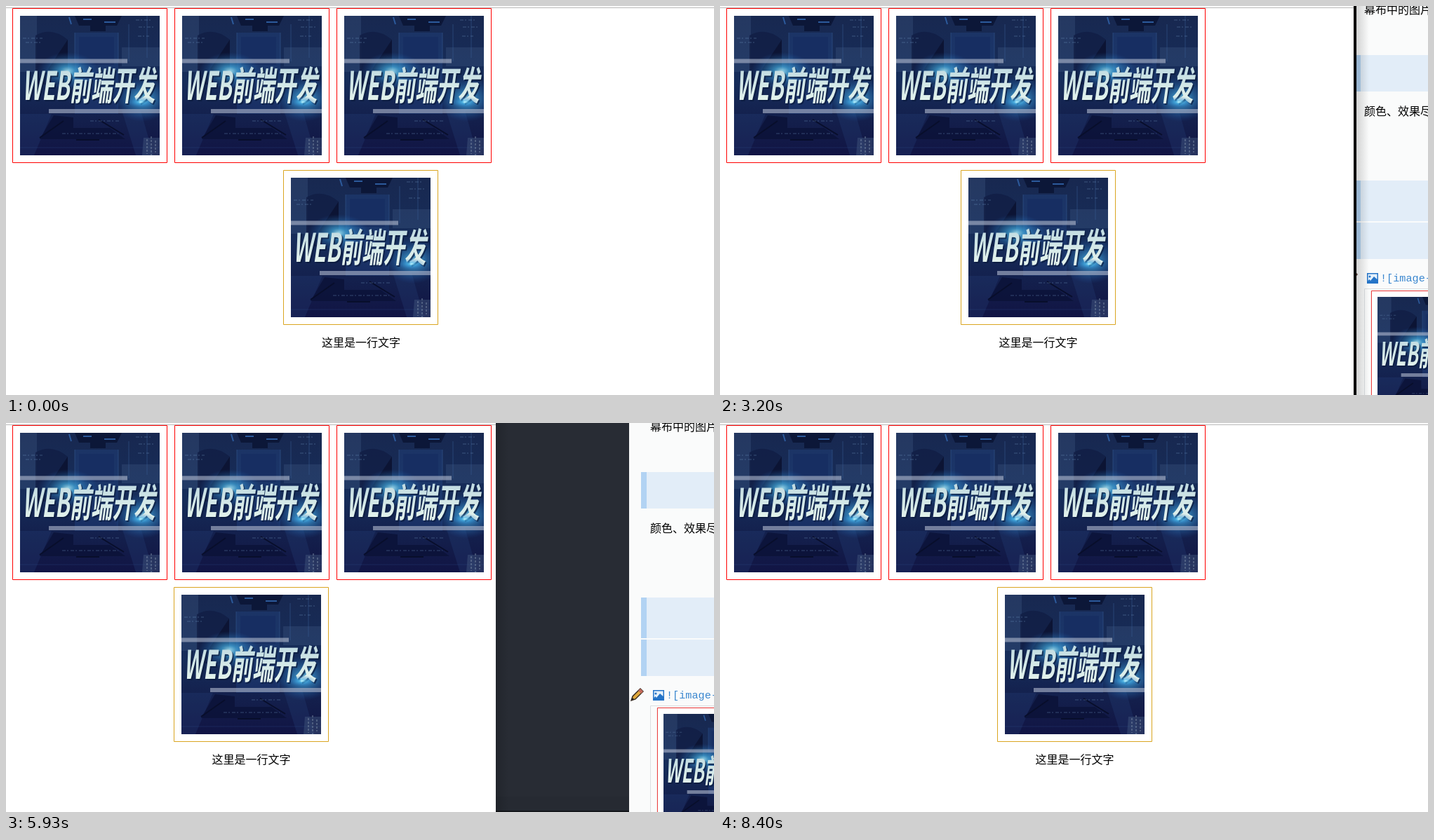
Animation, 1009 px wide and 555 px high, one loop 8470 ms. Source, as an HTML page:

```html
<!DOCTYPE html>
<html lang="zh">
<head>
<meta charset="utf-8">
<title>Window resize</title>
<style>
html, body { margin: 0; width: 100%; height: 100%; overflow: hidden; background: #fff; }
svg { display: block; }
text { font-family: "Noto Sans CJK SC", "Noto Sans CJK", sans-serif; font-size: 16px; fill: #000; white-space: pre; }
.title { font-size: 56px; font-weight: bold; fill: url(#letters); }
.code { font-family: "Liberation Mono", monospace; font-size: 15.2px; fill: #3a87cf; }
</style>
</head>
<body>
<svg width="1009" height="555" viewBox="0 0 1009 555">
  <defs>
    <linearGradient id="sky" x2="0" y2="1">
      <stop offset="0" stop-color="#182850"/>
      <stop offset=".45" stop-color="#162d5a"/>
      <stop offset=".8" stop-color="#131d4a"/>
      <stop offset="1" stop-color="#111444"/>
    </linearGradient>
    <linearGradient id="letters" x2="0" y2="1">
      <stop offset=".25" stop-color="#c2dce2"/>
      <stop offset=".8" stop-color="#e2f2ec"/>
    </linearGradient>
    <radialGradient id="glow">
      <stop offset="0" stop-color="#b5f4ff"/>
      <stop offset=".25" stop-color="#46b4ea" stop-opacity=".8"/>
      <stop offset="1" stop-color="#1e62b4" stop-opacity="0"/>
    </radialGradient>
    <linearGradient id="shade">
      <stop offset="0" stop-opacity=".16"/>
      <stop offset="1" stop-opacity="0"/>
    </linearGradient>
    <clipPath id="crop"><rect width="199" height="199"/></clipPath>

    <g id="photo" clip-path="url(#crop)">
      <rect width="199" height="199" fill="url(#sky)"/>
      <path d="M0 0H24V80H0ZM145 45H199V72H145Z" fill="#3c5680" opacity=".35"/>
      <path d="M22 28Q45 15 68 34V98H22Z" fill="#111d43" opacity=".75"/>
      <path d="M68 34V98L40 76Z" fill="#0b1230" opacity=".8"/>
      <path d="M78 24H140V140H78Z" fill="#23488a" opacity=".35"/>
      <path d="M84 30H134V70H84Z" fill="#162d61" opacity=".75"/>
      <path d="M78 0H145L138 14H122V22H100V14H84Z" fill="#0c1738"/>
      <path d="M90 5H102M120 9H136M70 2L73 12" stroke="#2c5a9c" stroke-width="2"/>
      <path d="M78 24V66M140 24V66M155 12V65M181 0V60" stroke="#386097" opacity=".5"/>
      <path d="M0 140H45L20 199H0ZM145 135H172L190 199H165Z" fill="#263f78" opacity=".3"/>
      <path d="M48 142L76 145V160H128L150 176H28Z" fill="#0a1237" opacity=".8"/>
      <path d="M28 174L62 150M112 148L148 170M80 177H113" stroke="#080e2b" stroke-width="2"/>
      <path d="M4 32H32M8 38H29M165 6H187M169 16H190M168 29H184M100 150H142M60 168H140" stroke="#7398c2" stroke-dasharray="5 2 2 3" opacity=".4"/>
      <path d="M0 188H199" stroke="#31518d" opacity=".3"/>
      <path d="M176 174H199V199H174Z" fill="#42597f" opacity=".45"/>
      <path d="M181 176V197M187 172V199M193 178V195" stroke="#8799ae" stroke-width="2" stroke-dasharray="3 2" opacity=".4"/>
      <ellipse cx="68" cy="79" rx="44" ry="27" fill="url(#glow)" opacity=".85"/>
      <ellipse cx="174" cy="119" rx="42" ry="32" fill="url(#glow)" opacity=".8"/>
      <path d="M0 64.5H153M41 136H199" stroke="#aeb7cc" stroke-width="6" opacity=".62"/>
      <g transform="translate(3 120) skewX(-8) scale(.545 1)">
        <text class="title" x="4" y="2" style="fill:#0a1a3c" opacity=".7">WEB前端开发</text>
        <text class="title">WEB前端开发</text>
      </g>
      <ellipse cx="172" cy="123" rx="20" ry="8" fill="url(#glow)" opacity=".85"/>
    </g>
    <g id="card">
      <rect x=".5" y=".5" width="220" height="220" fill="#fff" stroke="currentColor" vector-effect="non-scaling-stroke"/>
      <use href="#photo" x="11" y="11"/>
    </g>
  </defs>

  <!-- editor behind the window -->
  <rect width="1009" height="555" fill="#fafbfb"/>
  <rect width="888" height="555" fill="#282c34"/>
  <rect y="533" width="888" height="20" fill="#262a32"/>
  <rect y="553" width="888" height="2" fill="#15171b"/>
  <text x="918" y="11">幕布中的图片</text>
  <text x="918" y="156">颜色、效果尽</text>
  <path d="M905 70H1009V122H905ZM905 249H1009V307H905ZM905 309H1009V361H905Z" fill="#e2edf8"/>
  <path d="M905 70H913V122H905ZM905 249H913V307H905ZM905 309H913V361H905Z" fill="#b2d3f3"/>
  <path d="M891 396L893 390L904 379L908 383L897 394Z" fill="#e0a83c" stroke="#33261c" stroke-width="1.4"/>
  <path d="M891 396L893 392L895 394Z" fill="#222"/>
  <path d="M901 382L904 379L908 383L905 386Z" fill="#c46a5c"/>
  <rect x="922" y="381" width="16" height="15" fill="#2675c8"/>
  <path d="M923.5 382.5H936.5V390L932 386L927 392L925.5 390L923.5 392Z" fill="#e6f2fc"/>
  <circle cx="926" cy="386" r="1.5" fill="#2675c8"/>
  <text class="code" x="941" y="393">![image-</text>
  <path d="M918.5 555V403.5H1009" fill="none" stroke="#dcdfe2"/>
  <use href="#card" transform="translate(928 406) scale(.82)" color="#e83030"/>

  <!-- resized window -->
  <rect id="shadow" width="18" height="555" fill="url(#shade)"/>
  <rect id="edge" height="555"/>
  <rect id="page" height="555" fill="#fff"/>
  <rect id="rule" y="2" height="1" fill="#b8b8b8"/>
  <g color="red">
    <use href="#card" x="9" y="3"/>
    <use href="#card" x="240" y="3"/>
    <use href="#card" x="471" y="3"/>
  </g>
  <use id="centred" href="#card" y="234" color="#daa520"/>
  <text id="caption" y="486" text-anchor="middle">这里是一行文字</text>
</svg>
<script>
const $ = id => document.getElementById(id);
const LOOP = 8470, STEP = 1000 / 15;

// time, layout width, painted width, black border
const keys = [
  [0, 1012, 1012, 0], [2530, 1012, 1012, 0], [2600, 1005, 995, 6],
  [3400, 874, 872, 3], [3800, 825, 824, 2], [4270, 777, 776, 1],
  [4870, 727, 726, 0], [5130, 717, 716, 0], [5270, 717, 716, 0],
  [5530, 705, 704, 0], [5670, 705, 704, 0], [6070, 695, 694, 0],
  [6470, 695, 694, 0], [6870, 749, 750, 4], [7330, 833, 834, 4],
  [7730, 928, 929, 2], [8130, 1003, 1004, 2], [8200, 1003, 1004, 1],
  [8400, 1011, 1012, 0], [LOOP, 1011, 1012, 0]
];

function sample(t) {
  const i = keys.findIndex(k => k[0] > t), a = keys[i - 1], b = keys[i];
  const p = (t - a[0]) / (b[0] - a[0]);
  return a.map((v, j) => Math.round(v + (b[j] - v) * p));
}

function draw(now) {
  // 15 pictures a second, on a 10 ms clock
  const step = Math.min(126, Math.floor((now % LOOP + 4) / STEP));
  const [, layout, painted, border] = sample(Math.round(step * STEP / 10) * 10);
  $('page').setAttribute('width', painted);
  $('rule').setAttribute('width', painted);
  $('edge').setAttribute('x', painted);
  $('edge').setAttribute('width', border);
  $('shadow').setAttribute('x', painted + border);
  $('centred').setAttribute('x', Math.floor((layout - 221) / 2));
  $('caption').setAttribute('x', layout / 2);
  requestAnimationFrame(draw);
}
requestAnimationFrame(draw);
</script>
</body>
</html>
```
